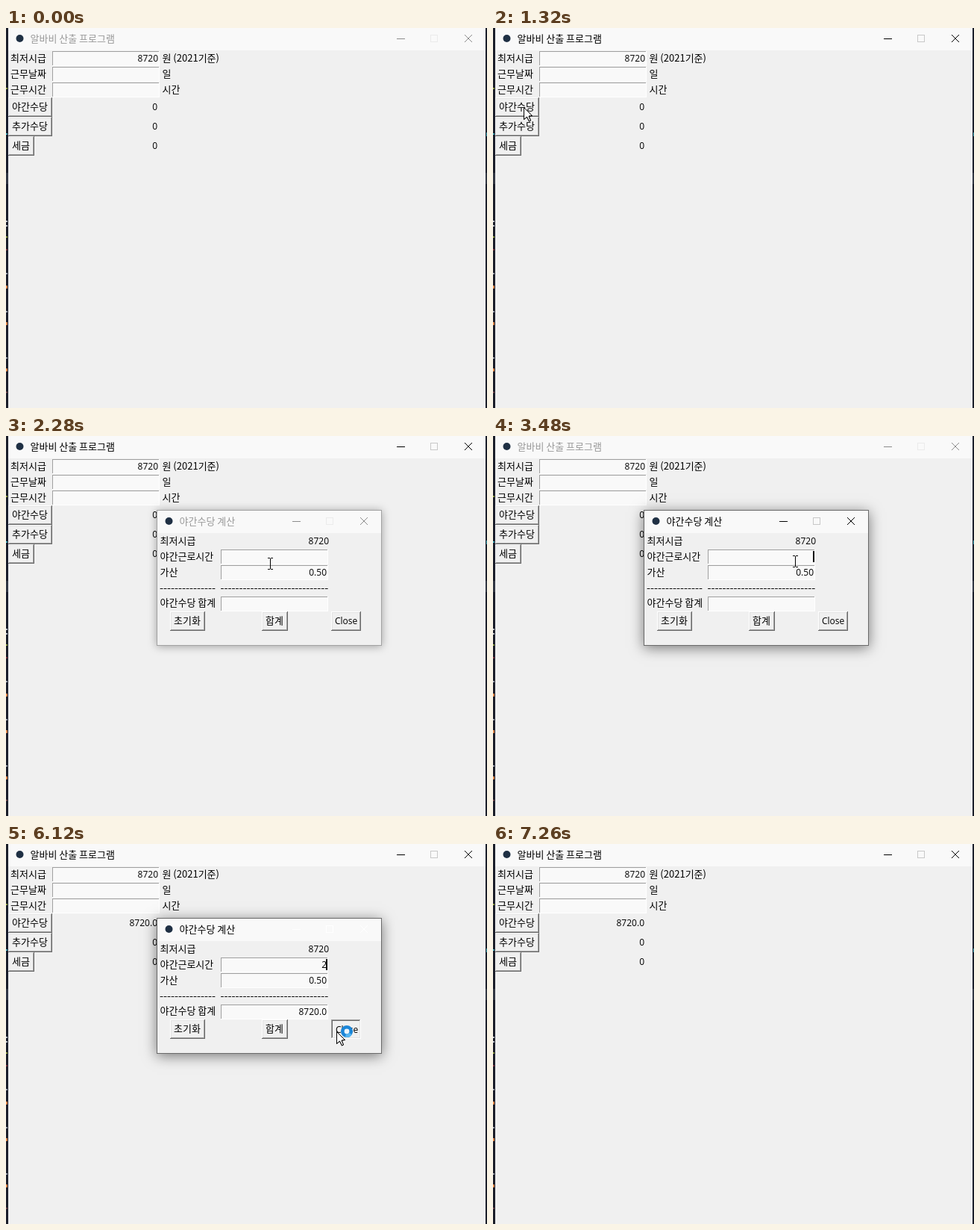
An HTML page with a canvas that plays this animation: 645x509 px, repeating every 8 s.

```html
<!DOCTYPE html>
<html lang="ko">
<head>
<meta charset="utf-8">
<title>알바비 산출 프로그램</title>
<style>
html, body { margin: 0; width: 100%; height: 100%; overflow: hidden; background: #1c1f2b; }
canvas { display: block; }
</style>
</head>
<body>
<canvas id="stage" width="645" height="509"></canvas>
<script>
const W = 645, H = 509, LOOP = 8000, STEP = 60;
const stage = document.getElementById('stage').getContext('2d');
const layer = document.createElement('canvas');
layer.width = W;
layer.height = H;
const dialogCtx = layer.getContext('2d');
let g = stage;

const HANGUL = '13px "Noto Sans CJK KR", "Noto Sans CJK", sans-serif';
const LATIN = '12px "Open Sans", "Noto Sans", sans-serif';
const DASHES = '14.4px "Noto Sans CJK KR", "Noto Sans CJK", sans-serif';
const FACE = '#f0f0f0', PALE = '#f9f9f9', GREY = '#999';

// Pointer stops: time, x, y
const path = [
  [60, 628, 134], [300, 420, 60], [420, 300, 50], [660, 110, 80], [900, 41, 106],
  [1620, 41, 106], [2040, 200, 165], [2220, 316, 172], [2400, 403, 168],
  [2760, 403, 168], [2880, 405, 168], [3840, 405, 168], [4140, 385, 215],
  [4440, 369, 253], [4860, 369, 253], [4980, 357, 258], [5220, 400, 260],
  [5520, 443, 251], [6240, 443, 251], [6480, 350, 190], [6600, 230, 140],
  [6780, 152, 112], [6900, 190, 95], [7020, 340, 62], [7200, 636, 80]
];

const between = (t, a, b) => t >= a && t < b;
const clamp = v => Math.max(0, Math.min(1, v));

function rect(x, y, w, h, color) {
  g.fillStyle = color;
  g.fillRect(x, y, w, h);
}

function text(s, x, y, font = HANGUL, color = '#000', align = 'left') {
  g.font = font;
  g.fillStyle = color;
  g.textAlign = align;
  g.fillText(s, x, y);
}

const number = (s, right, y) => text(s, right, y, LATIN, '#000', 'right');

function line(points, color, close) {
  g.beginPath();
  points.forEach(([x, y]) => g.lineTo(x, y));
  if (close) g.closePath();
  g.strokeStyle = color;
  g.lineWidth = 1;
  g.stroke();
}

function bevel(x, y, w, h, light, dark) {
  rect(x, y, w, h, dark);
  rect(x, y, w - 1, h - 1, light);
}

function field(x, y) {
  bevel(x, y, 144, 20, '#a0a0a0', '#fff');
  rect(x + 1, y + 1, 142, 18, PALE);
}

function button(label, x, y, w, pressed, font) {
  const h = 26, d = pressed ? 1 : 0;
  if (pressed) {
    bevel(x, y, w, h, '#a0a0a0', '#fff');
    bevel(x + 1, y + 1, w - 2, h - 2, '#696969', '#e3e3e3');
  } else {
    bevel(x, y, w, h, '#fff', '#696969');
    bevel(x + 1, y + 1, w - 2, h - 2, '#e3e3e3', '#a0a0a0');
  }
  rect(x + 2, y + 2, w - 4, h - 4, FACE);
  text(label, x + 5 + d, y + 17 + d, font);
}

function titleBar(x, y, w, title, ink, icon, box, minX) {
  rect(x, y, w, 30, PALE);
  g.beginPath();
  g.arc(x + 15.5, y + 14, 5, 0, 7);
  g.fillStyle = '#1f3044';
  g.fill();
  text(title, x + 29.5, y + 18.5, HANGUL, ink);
  rect(minX, y + 14, 11, 1, icon);
  g.strokeStyle = box;
  g.lineWidth = 1;
  g.strokeRect(minX + 45.5, y + 9.5, 9, 9);
  const cx = minX + 91, cy = y + 9;
  line([[cx, cy], [cx + 10, cy + 10]], icon);
  line([[cx + 10, cy], [cx, cy + 10]], icon);
}

function backdrop() {
  rect(0, 0, W, H, '#1c1f2b');
  rect(0, 194, W, 15, '#323743');
  const specks = [
    [80, '#8a9a3c'], [141, '#3fa7b5'], [258, '#b9bdc6'], [264, '#b9bdc6'],
    [279, '#8a9a3c'], [296, '#7a2f3a'], [328, '#9aa0ac'], [345, '#d98245'],
    [379, '#9aa0ac'], [394, '#d98245'], [441, '#9aa0ac'], [456, '#d98245'], [487, '#6a4048']
  ];
  specks.forEach(([y, c]) => rect(0, y, 2, y === 345 || y === 394 || y === 456 ? 4 : 2, c));
  rect(644, 140, 1, 5, '#3fa7b5');
}

function mainWindow(t) {
  const active = between(t, 1140, 2580) || t >= 6060;
  rect(3, 0, 640, H, FACE);
  titleBar(3, 0, 640, '알바비 산출 프로그램', active ? '#000' : GREY,
    active ? '#000' : '#8c8c8c', active ? '#c8c8c8' : '#ebebeb', 524);
  ['최저시급', '근무날짜', '근무시간'].forEach((s, i) => {
    text(s, 6, 45 + 21 * i);
    field(62, 31 + 21 * i);
  });
  number('8720', 204, 45);
  ['원 (2021기준)', '일', '시간'].forEach((s, i) => text(s, 209.5, 45 + 21 * i));
  button('야간수당', 3, 93, 59, between(t, 1140, 1260));
  button('추가수당', 3, 119, 59);
  button('세금', 3, 145, 35);
  number(t >= 6060 ? '8720.0' : '0', 203, 110);
  number('0', 203, 136);
  number('0', 203, 162);
}

function dialog(t) {
  const active = between(t, 2580, 6060), fresh = t < 2580;
  g.clearRect(0, 0, W, H);
  g.save();
  g.shadowColor = `rgba(0,0,0,${fresh ? 0.34 : 0.5})`;
  g.shadowBlur = fresh ? 11 : 17;
  g.shadowOffsetY = fresh ? 1 : 3;
  rect(202, 99, 302, 182, fresh ? '#a2a2a2' : '#6a6a6a');
  g.restore();
  rect(203, 100, 300, 180, FACE);
  titleBar(203, 100, 300, '야간수당 계산', fresh ? GREY : '#000',
    active ? '#000' : fresh ? '#8c8c8c' : '#fff',
    active ? '#c8c8c8' : fresh ? '#ebebeb' : '#fff', 384);

  text('최저시급', 206.5, 145);
  number('8720', 433, 145);
  text('야간근로시간', 206.5, 166);
  text('가산', 206.5, 187);
  text('야간수당 합계', 206.5, 228);
  text('-'.repeat(15), 206, 209, DASHES);
  text('-'.repeat(29), 287.5, 209, DASHES);
  [152, 173, 215].forEach(y => field(288, y));
  number('0.50', 430, 187);
  if (t >= 3720) number('2', 430, 166);
  if (t >= 4680) number('8720.0', 430, 229);
  const origin = t < 4900 ? 2580 : 2520;
  if (t >= 2580 && (t - origin) % 900 < 600) rect(429, 154, 2, 15, '#000');

  button('초기화', 220, 235, 47);
  button('합계', 343, 235, 35, between(t, 4500, 4680));
  button('Close', 436, 235, 40, between(t, 5880, 6240), LATIN);
}

function showDialog(t) {
  const alpha = t < 2000 ? clamp((t - 1320) / 210) : clamp((6420 - t) / 220);
  if (!alpha) return;
  g = dialogCtx;
  dialog(t);
  g = stage;
  const zoom = t < 2000 ? 1 - 0.06 * clamp((1500 - t) / 180) : 0.92 + 0.08 * alpha;
  g.save();
  g.globalAlpha = alpha;
  g.translate(353, 190);
  g.scale(zoom, zoom);
  g.drawImage(layer, -353, -190);
  g.restore();
}

// Cubic motion through the stops, at rest on both sides of a pause
function pointer(t) {
  const last = path.length - 1;
  let i = path.findIndex(p => p[0] > t) - 1;
  if (i < 0) i = last - 1;
  const a = path[i], b = path[i + 1], span = b[0] - a[0];
  const u = clamp((t - a[0]) / span);
  const slope = (k, c) => {
    const p = path[Math.max(0, k - 1)], q = path[k], n = path[Math.min(last, k + 1)];
    const still = (m, o) => m !== o && Math.hypot(m[1] - o[1], m[2] - o[2]) < 3;
    return still(p, q) || still(q, n) ? 0 : (n[c] - p[c]) / (n[0] - p[0]) * span;
  };
  return [1, 2].map(c => {
    const m = slope(i, c), n = slope(i + 1, c), d = b[c] - a[c];
    return Math.round(a[c] + u * (m + u * (3 * d - 2 * m - n + u * (m + n - 2 * d))));
  });
}

function overField(t, x, y) {
  const hit = (left, top) => between(x, left, left + 144) && between(y, top, top + 20);
  return [31, 52, 73].some(v => hit(62, v)) ||
    between(t, 1500, 6060) && [152, 173, 215].some(v => hit(288, v));
}

function arrow(x, y) {
  const shape = [[0, 0], [0, 16], [4, 12.5], [7, 18.5], [9, 17.5], [6.5, 11.5], [11, 11]];
  const pts = shape.map(([a, b]) => [x + a + 0.5, y + b + 0.5]);
  line(pts, '#000', true);
  g.fillStyle = '#fff';
  g.fill();
  line(pts, '#000', true);
}

function beam(x, y) {
  rect(x, y - 7, 1, 14, '#000');
  [-8, 7].forEach(d => {
    rect(x - 3, y + d, 3, 1, '#000');
    rect(x + 1, y + d, 3, 1, '#000');
  });
}

function busyRing(x, y, t) {
  const ring = (from, to, color) => {
    g.beginPath();
    g.arc(x, y, 5.7, from, to);
    g.lineWidth = 4.6;
    g.strokeStyle = color;
    g.stroke();
  };
  g.beginPath();
  g.arc(x, y, 4, 0, 7);
  g.fillStyle = '#eef6fc';
  g.fill();
  ring(0, 7, '#1b86d8');
  const spin = t / 160;
  ring(spin, spin + 1.3, '#55b4f0');
}

function drawPointer(t) {
  if (!between(t, 60, 7260)) return;
  const [x, y] = pointer(t);
  if (overField(t, x, y)) beam(x, y);
  else arrow(x, y);
  if (between(t, 6060, 6300)) busyRing(x + 14, y, t);
}

const start = performance.now();

function frame() {
  const now = Math.max(0, performance.now() - start) % LOOP;
  const t = Math.floor(now / STEP) * STEP;
  backdrop();
  mainWindow(t);
  showDialog(t);
  drawPointer(t);
  requestAnimationFrame(frame);
}
frame();
</script>
</body>
</html>
```
